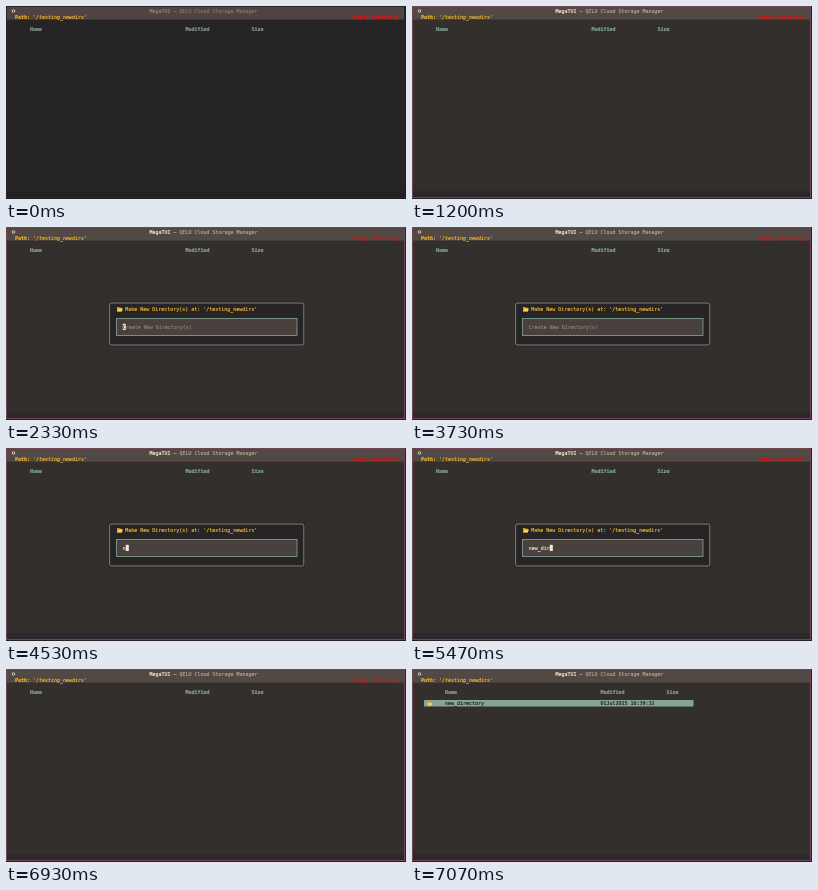
An HTML page with a canvas that plays this animation: 400x193 px, repeating every 8 s.

```html
<!DOCTYPE html>
<html lang="en">
<head>
<meta charset="utf-8">
<title>Terminal file manager</title>
<style>
  html, body { margin: 0; width: 100%; height: 100%; overflow: hidden; background: #1c181c; }
  canvas { display: block; width: 400px; height: 193px; }
</style>
</head>
<body>
<canvas id="stage" width="400" height="193"></canvas>
<script>
const ctx = document.getElementById('stage').getContext('2d');
const LOOP = 8000, CELL = 3;
const PATH = "'/testing_newdirs'";
const PLACEHOLDER = 'Create New Directory(s)';
const ENTRY = 'new_directory';
const BLINKS = [2730, 3200, 3730, 4200];
const KEYS = [4530, 4600, 4670, 5070, 5200, 5330, 5470, 5530, 5730, 5930, 6070, 6130, 6330];
const YELLOW = '#eeb42f', TEAL = '#85a598', CREAM = '#f4ead0';

const clamp = v => Math.min(1, Math.max(0, v));
const easeOut = v => 1 - (1 - clamp(v)) ** 2;
const passed = (times, t) => times.filter(at => t >= at).length;
const mix = (a, b, k) => `rgb(${a.map((v, i) => v + (b[i] - v) * k)})`;

function rect(x, y, w, h, color) {
  ctx.fillStyle = color;
  ctx.fillRect(x, y, w, h);
}

// Drawn large and scaled down to keep fractional advances; the thin stroke gives a medium weight.
function text(str, x, y, color, style = '') {
  ctx.save();
  ctx.translate(x, y + 1.8);
  ctx.scale(0.1, 0.1);
  ctx.font = `${style} 49.8px "DejaVu Sans Mono", monospace`;
  ctx.fillStyle = ctx.strokeStyle = color;
  ctx.lineWidth = 1.5;
  ctx.fillText(str, 0, 0);
  ctx.strokeText(str, 0, 0);
  ctx.restore();
}

function folder(x, y, open) {
  rect(x, y - 2.2, 2.4, 1.2, '#d99a1c');
  rect(x, y - 1.5, 4.8, 3.7, '#d99a1c');
  ctx.fillStyle = '#ffce4a';
  ctx.beginPath();
  ctx.moveTo(x + (open ? 1.3 : 0), y - 0.6);
  ctx.lineTo(x + (open ? 6 : 4.8), y - 0.6);
  ctx.lineTo(x + 4.8, y + 2.2);
  ctx.lineTo(x, y + 2.2);
  ctx.fill();
}

function drawWindow(t) {
  const focus = easeOut((t - 30) / 840);
  const titleIn = easeOut((t - 30) / 1170);
  const listed = t >= 7070;

  rect(0, 0, 400, 193, mix([30, 27, 30], [40, 30, 37], focus));
  rect(0, 0, 399, 192, mix([40, 36, 39], [112, 70, 84], focus));
  rect(1, 1, 397, 190, mix([39, 36, 38], [50, 47, 45], focus));
  rect(1, 185.5, 397, 5.5, mix([34, 31, 35], [43, 39, 42], focus));
  rect(1, 1, 397, 12.6, mix([78, 69, 67], [82, 73, 69], focus));

  ctx.strokeStyle = CREAM;
  ctx.lineWidth = 0.8;
  ctx.beginPath();
  ctx.arc(7.5, 5, 1.3, 0, 7);
  ctx.stroke();

  text('MegaTUI', 143.5, 5, mix([145, 134, 124], [246, 236, 208], titleIn));
  text('— QELU Cloud Storage Manager', 143.5 + 8 * CELL, 5,
    mix([130, 119, 111], [176, 165, 149], titleIn));
  text('Path:', 9, 11, YELLOW, 'bold');
  text(PATH, 9 + 6 * CELL, 11, YELLOW, 'italic');
  if (!listed) text('Empty directory', 347.5, 11, mix([222, 20, 18], [204, 24, 20], focus), 'bold');

  const shift = listed ? 9 : 0;
  const heading = mix([138, 154, 144], [133, 165, 152], focus);
  text('Name', 24 + shift, 23, heading, 'bold');
  text('Modified', 179.5 + shift, 23, heading, 'bold');
  text('Size', 245.5 + shift, 23, heading, 'bold');

  if (listed) {
    rect(12, 31, 269.5, 6.5, TEAL);
    folder(15.5, 34.4, false);
    text(ENTRY, 33, 34.2, '#1d2021');
    text('01Jul2025 16:39:32', 188.5, 34.2, '#1d2021');
  }
}

function drawDialog(t) {
  ctx.globalAlpha = easeOut((t - 1600) / 600);

  rect(102.5, 74.5, 196.5, 45, '#272426');
  ctx.strokeStyle = '#a0968a';
  ctx.lineWidth = 0.8;
  ctx.beginPath();
  ctx.roundRect(103.6, 76, 194.2, 42, 1.5);
  ctx.stroke();

  folder(111, 82.2, true);
  text(`Make New Directory(s) at: ${PATH}`, 119.3, 82, YELLOW);

  rect(110.5, 91.5, 180.5, 17, '#48413e');
  ctx.strokeStyle = TEAL;
  ctx.strokeRect(110.5, 91.5, 180.5, 17);

  const typed = passed(KEYS, t);
  const cursorOn = typed || passed(BLINKS, t) % 2 === 0;
  const left = 116.8, cursor = left + typed * CELL;
  if (typed) text(ENTRY.slice(0, typed), left, 100, '#f0e4c4');
  else text(PLACEHOLDER, left, 100, '#8c8175');
  if (cursorOn) {
    rect(cursor, 96.8, CELL, 6.2, CREAM);
    if (!typed) text(PLACEHOLDER[0], left, 100, '#48413e');
  }
  ctx.globalAlpha = 1;
}

function frame(now) {
  const t = now % LOOP;
  drawWindow(t);
  if (t >= 1670 && t < 6930) drawDialog(t);
  requestAnimationFrame(frame);
}
requestAnimationFrame(frame);
</script>
</body>
</html>
```
